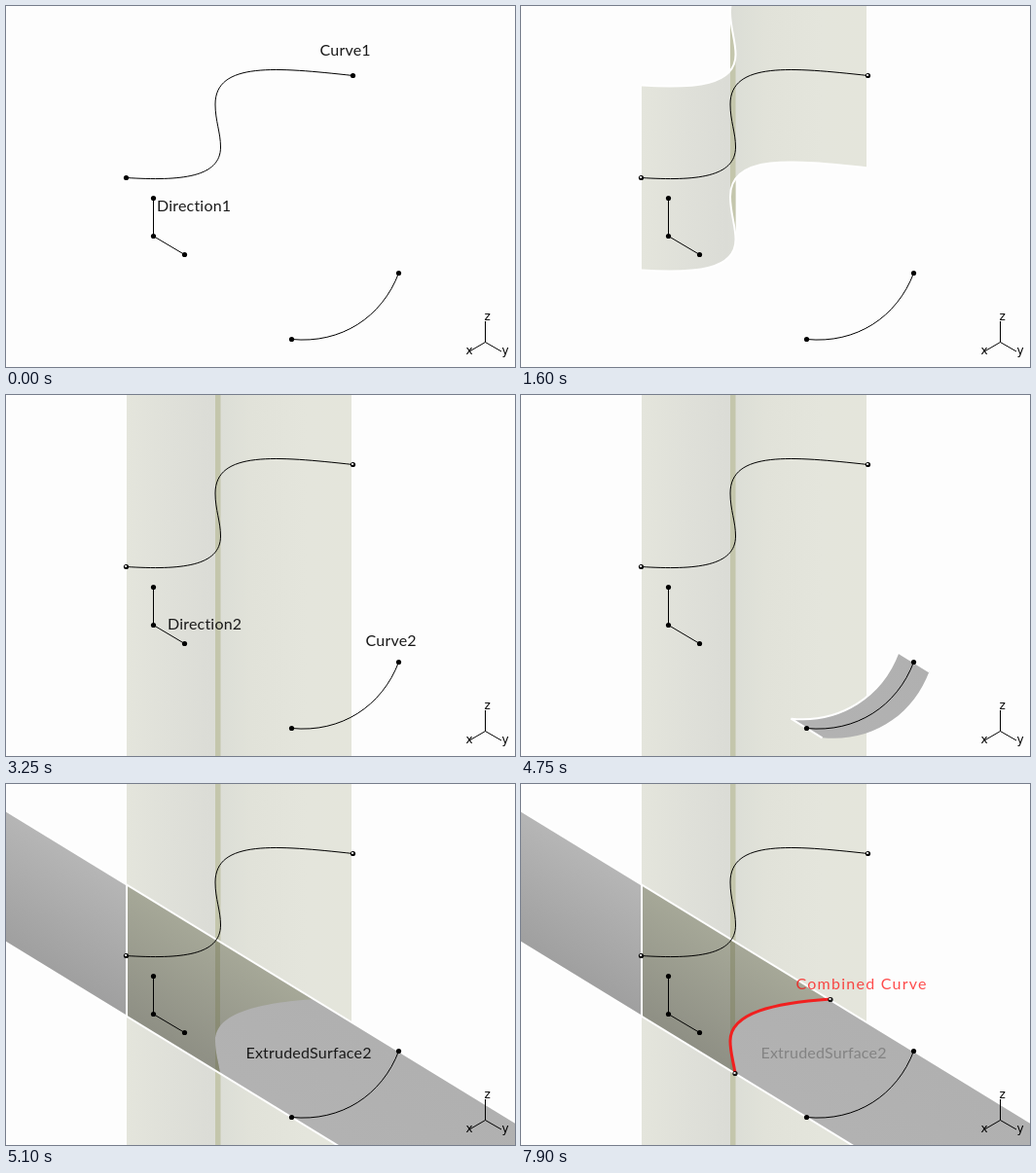
These frames come from a looping animation (523 by 371 pixels, 8 s). An HTML page with a canvas:

```html
<!DOCTYPE html>
<html lang="en">
<head>
<meta charset="utf-8">
<title>Combined curve</title>
<style>
html, body { margin: 0; width: 100%; height: 100%; overflow: hidden; background: #fdfdfd; }
canvas { display: block; }
</style>
</head>
<body>
<canvas id="stage" width="523" height="371"></canvas>
<script>
const W = 523, H = 371, LOOP = 8000;
const ctx = document.getElementById('stage').getContext('2d');

// Bezier segments: x0, y0, x1, y1, x2, y2, x3, y3
const curve1 = [
  [123.5, 176.5, 180, 180, 220.5, 176, 220.5, 145],
  [220.5, 145, 220.5, 130, 215, 118, 215, 101],
  [215, 101, 215, 57, 278, 63, 356.5, 71.5]
];
const curve2 = [[293.5, 342.5, 344.5, 347.5, 386.5, 319.5, 403.5, 274.5]];
const combined = [
  [318, 221, 260, 225, 215, 235, 215, 264],
  [215, 264, 215, 276, 218, 284, 220, 297]
];
const SLOPE = 0.612;
const GROWTH = 1.676;

function bezier(s, dx, dy) {
  ctx.bezierCurveTo(s[2] + dx, s[3] + dy, s[4] + dx, s[5] + dy, s[6] + dx, s[7] + dy);
}

function trace(segs, dx = 0, dy = 0) {
  ctx.moveTo(segs[0][0] + dx, segs[0][1] + dy);
  segs.forEach(s => bezier(s, dx, dy));
}

function strokeCurve(segs, color, width, dx = 0, dy = 0) {
  ctx.beginPath();
  trace(segs, dx, dy);
  ctx.strokeStyle = color;
  ctx.lineWidth = width;
  ctx.stroke();
}

function line(x0, y0, x1, y1, color, width) {
  ctx.beginPath();
  ctx.moveTo(x0, y0);
  ctx.lineTo(x1, y1);
  ctx.strokeStyle = color;
  ctx.lineWidth = width;
  ctx.stroke();
}

// Area covered by one segment moved from -(dx, dy) to +(dx, dy)
function sweep(s, dx, dy) {
  ctx.beginPath();
  trace([s], -dx, -dy);
  ctx.lineTo(s[6] + dx, s[7] + dy);
  ctx.bezierCurveTo(s[4] + dx, s[5] + dy, s[2] + dx, s[3] + dy, s[0] + dx, s[1] + dy);
  ctx.closePath();
}

function gradient(x0, y0, x1, y1, stops) {
  const g = ctx.createLinearGradient(x0, y0, x1, y1);
  stops.forEach(([at, color]) => g.addColorStop(at, color));
  return g;
}

// Gradient from the upper to the lower edge of the band
const across = (top, bottom) => gradient(403, 274, 344.4, 369.8, [[0, top], [1, bottom]]);

const wall = gradient(123, 0, 356, 0, [
  [0, '#e4e5dc'], [0.2, '#dfe0d9'], [0.38, '#dbdcd6'],
  [0.45, '#dddfd7'], [0.55, '#e1e2d9'], [0.8, '#e4e5dc'], [1, '#e4e5db']
]);
const bandBack = across('#b6b6b6', '#a0a0a0');
const bandFront = across('#b0b0b0', '#b2b2b2');
const bandBehind = across('#a6a898', '#8f9085');

function dot(x, y, glint) {
  ctx.beginPath();
  ctx.arc(x, y, 2.6, 0, 7);
  ctx.fillStyle = '#000';
  ctx.fill();
  if (glint) {
    ctx.fillStyle = '#fff';
    ctx.fillRect(x - 1.5, y - 1.5, 2, 2);
  }
}

function label(text, x, y, color = '#1a1a1a', spacing = 0.2) {
  ctx.font = '16px Lato, sans-serif';
  ctx.letterSpacing = spacing + 'px';
  ctx.fillStyle = color;
  ctx.fillText(text, x, y);
  ctx.letterSpacing = '0px';
}

function drawWall(h) {
  ctx.save();
  ctx.beginPath();
  ctx.rect(124, 0, 231, H);
  ctx.clip();
  [0, 2].forEach(i => {
    sweep(curve1[i], 0, h);
    ctx.fillStyle = wall;
    ctx.fill();
  });
  sweep(curve1[1], 0, h);
  ctx.fillStyle = '#c4c6ac';
  ctx.fill();
  strokeCurve(curve1, '#fff', 2, 0, -h);
  strokeCurve(curve1, '#fff', 2, 0, h);
  ctx.restore();
}

function drawBand(d) {
  const dx = d, dy = d * SLOPE;
  ctx.save();
  sweep(curve2[0], dx, dy);
  ctx.clip();
  ctx.fillStyle = bandFront;
  ctx.fillRect(0, 0, W, H);
  ctx.fillStyle = bandBack;
  ctx.fillRect(0, 0, 123, H);

  // Part seen through the wall
  ctx.beginPath();
  trace(combined);
  [[220, H], [123, H], [123, 0], [318, 0]].forEach(p => ctx.lineTo(...p));
  ctx.closePath();
  ctx.clip();
  ctx.fillStyle = bandBehind;
  ctx.fillRect(0, 0, W, H);
  ctx.fillStyle = 'rgba(120,124,84,0.4)';
  ctx.fillRect(215, 0, 5, H);
  line(123.5, 0, 123.5, H, '#fff', 3);
  ctx.restore();

  strokeCurve(curve2, '#fff', 2, -dx, -dy);
  [[293.5, 342.5], [403.5, 274.5]].forEach(([x, y]) =>
    line(x - dx, y - dy, x + dx, y + dy, '#fff', 2));
}

function drawWires(solid) {
  strokeCurve(curve1, '#000', 1);
  strokeCurve(curve2, '#000', 1);
  line(151.5, 197, 151.5, 236, '#000', 1);
  line(151.5, 236.5, 183.5, 255.5, '#000', 1);
  dot(123.5, 176.5, solid);
  dot(356.5, 71.5, solid);
  [[151.5, 197.5], [151.5, 236.5], [183.5, 255.5], [293.5, 342.5], [403.5, 274.5]]
    .forEach(p => dot(...p));
}

function drawAxes() {
  line(492.5, 345.5, 492.5, 324, '#000', 1);
  line(492.5, 345.5, 477, 354.5, '#000', 1);
  line(492.5, 345.5, 509, 355, '#000', 1);
  ctx.font = '12px "DejaVu Sans", sans-serif';
  ctx.fillStyle = '#000';
  ctx.fillText('z', 491.5, 323);
  ctx.fillText('x', 472.5, 358);
  ctx.fillText('y', 509.5, 358);
}

function drawCombined(p) {
  ctx.globalAlpha = Math.min(0.35, p * 7);
  strokeCurve(combined, '#e07060', 1.2);
  ctx.globalAlpha = Math.min(1, p * 1.3);
  strokeCurve(combined, '#f81414', 3);
  dot(318, 221.5, true);
  dot(220, 297.5, true);
  ctx.globalAlpha = p;
  label('Combined Curve', 282.5, 211, '#f00', 1.25);
  ctx.globalAlpha = 1;
}

// Number of steps begun since a start time
const steps = (t, start, ms, max) =>
  Math.max(0, Math.min(max, Math.floor((t - start) / ms) + 1));

function draw(t) {
  ctx.fillStyle = '#fdfdfd';
  ctx.fillRect(0, 0, W, H);

  const a = steps(t, 1500, 50, 6);
  const b = steps(t, 4750, 50, 8);
  const fade = steps(t, 6600, 100, 14) / 20;

  if (a) drawWall(95 * GROWTH ** (a - 3));
  if (b) drawBand(16 * GROWTH ** (b - 1));
  drawWires(a > 0);
  drawAxes();

  if (t < 1500) {
    label('Curve1', 322.5, 51);
    label('Direction1', 155, 211);
  } else if (t >= 1750 && t < 3250) {
    label('ExtrudedSurface1', 242.5, 153);
  } else if (t >= 3250 && t < 4750) {
    label('Curve2', 369.5, 258);
    label('Direction2', 166, 241);
  } else if (t >= 5100) {
    ctx.globalAlpha = 1 - fade;
    label('ExtrudedSurface2', 246.5, 282);
    ctx.globalAlpha = 1;
  }
  if (fade) drawCombined(fade);
}

const start = performance.now();
function tick() {
  draw((performance.now() - start) % LOOP);
  requestAnimationFrame(tick);
}
tick();
</script>
</body>
</html>
```
